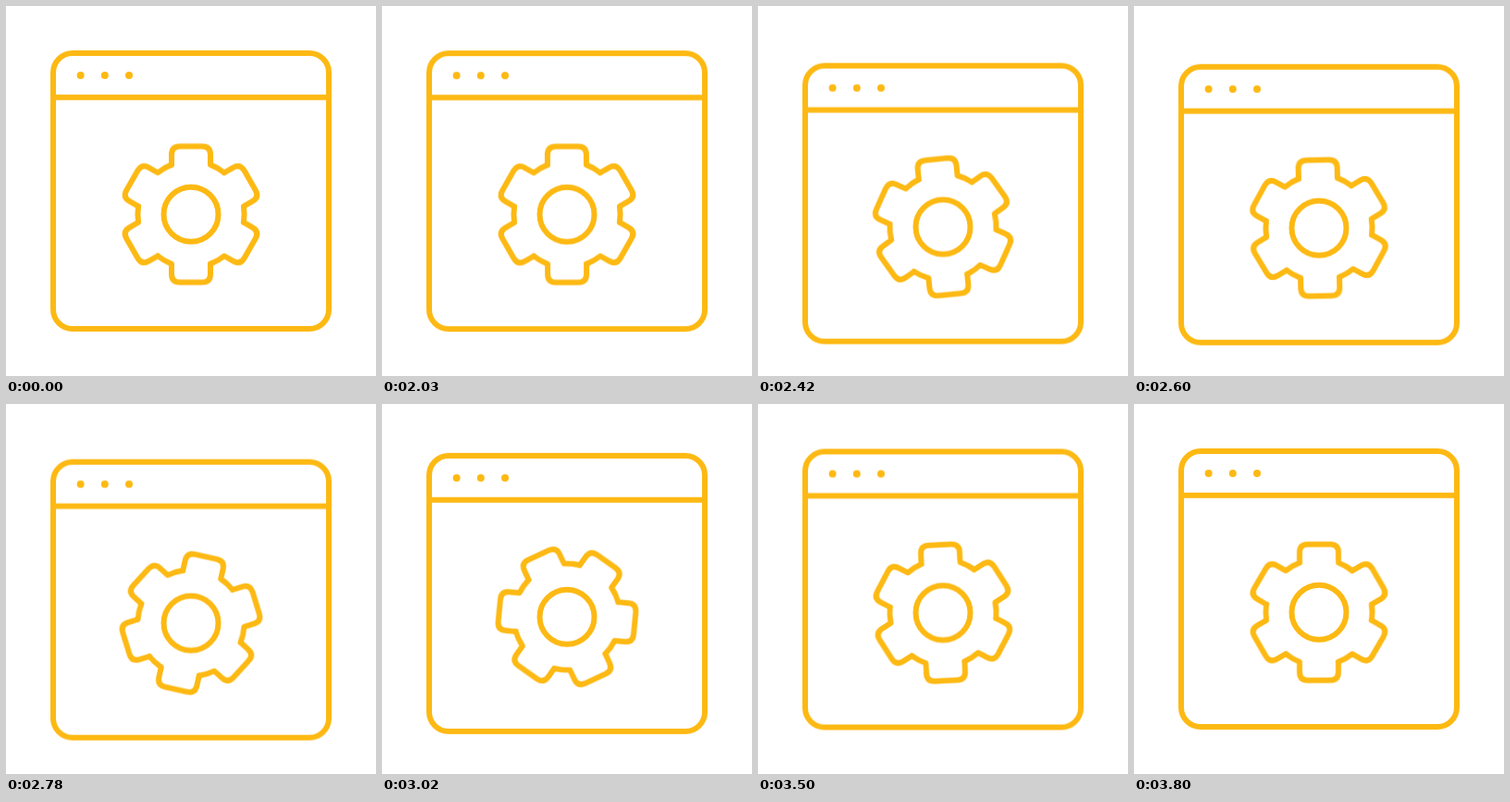
An HTML page without scripts for the animation above (3.83 s loop, 400 by 400 pixels).

```html
<!DOCTYPE html>
<html lang="en">
<head>
<meta charset="utf-8">
<title>Window settings</title>
<style>
  html, body { margin: 0; width: 100%; height: 100%; overflow: hidden; background: #fff; }
  svg { display: block; width: 100%; height: 100%; }
  .line { fill: none; stroke: #fdb913; stroke-width: 6; stroke-linecap: round; stroke-linejoin: round; }
  .dots { fill: #fdb913; stroke: none; }

  .window { animation: dip 3830ms infinite; }
  .gear { animation: turn 3830ms infinite; }

  /* dip: 2000 to 2520 ms down, back up by 3800 ms */
  @keyframes dip {
    0% { transform: translateY(0); }
    52.219% { transform: translateY(0); animation-timing-function: cubic-bezier(.33, 0, .67, 1); }
    65.796% { transform: translateY(15px); animation-timing-function: cubic-bezier(.33, 0, .15, 1); }
    99.217%, 100% { transform: translateY(0); }
  }

  /* turn: short wind-up to 2410 ms, then one tooth forward */
  @keyframes turn {
    0% { transform: rotate(0deg); }
    52.219% { transform: rotate(0deg); animation-timing-function: cubic-bezier(.33, 0, .67, 1); }
    62.924% { transform: rotate(-5.7deg); animation-timing-function: cubic-bezier(.33, 0, .33, 1); }
    99.217%, 100% { transform: rotate(60deg); }
  }
</style>
</head>
<body>
<svg viewBox="0 0 400 400">
  <defs>
    <path id="tooth" d="M-21-53.6V-64.5Q-21-73.5-12-73.5H12Q21-73.5 21-64.5V-53.6A57.6 57.6 0 0 1 35.9-45"/>
  </defs>
  <g class="window line">
    <rect x="51" y="51" width="298" height="298" rx="21"/>
    <path d="M51 98.7H349"/>
    <g class="dots">
      <circle cx="80.6" cy="75" r="4"/>
      <circle cx="106.8" cy="75" r="4"/>
      <circle cx="133" cy="75" r="4"/>
    </g>
    <g transform="translate(200 225.2)">
      <circle r="29.5"/>
      <g class="gear">
        <use href="#tooth"/>
        <use href="#tooth" transform="rotate(60)"/>
        <use href="#tooth" transform="rotate(120)"/>
        <use href="#tooth" transform="rotate(180)"/>
        <use href="#tooth" transform="rotate(240)"/>
        <use href="#tooth" transform="rotate(300)"/>
      </g>
    </g>
  </g>
</svg>
</body>
</html>
```
